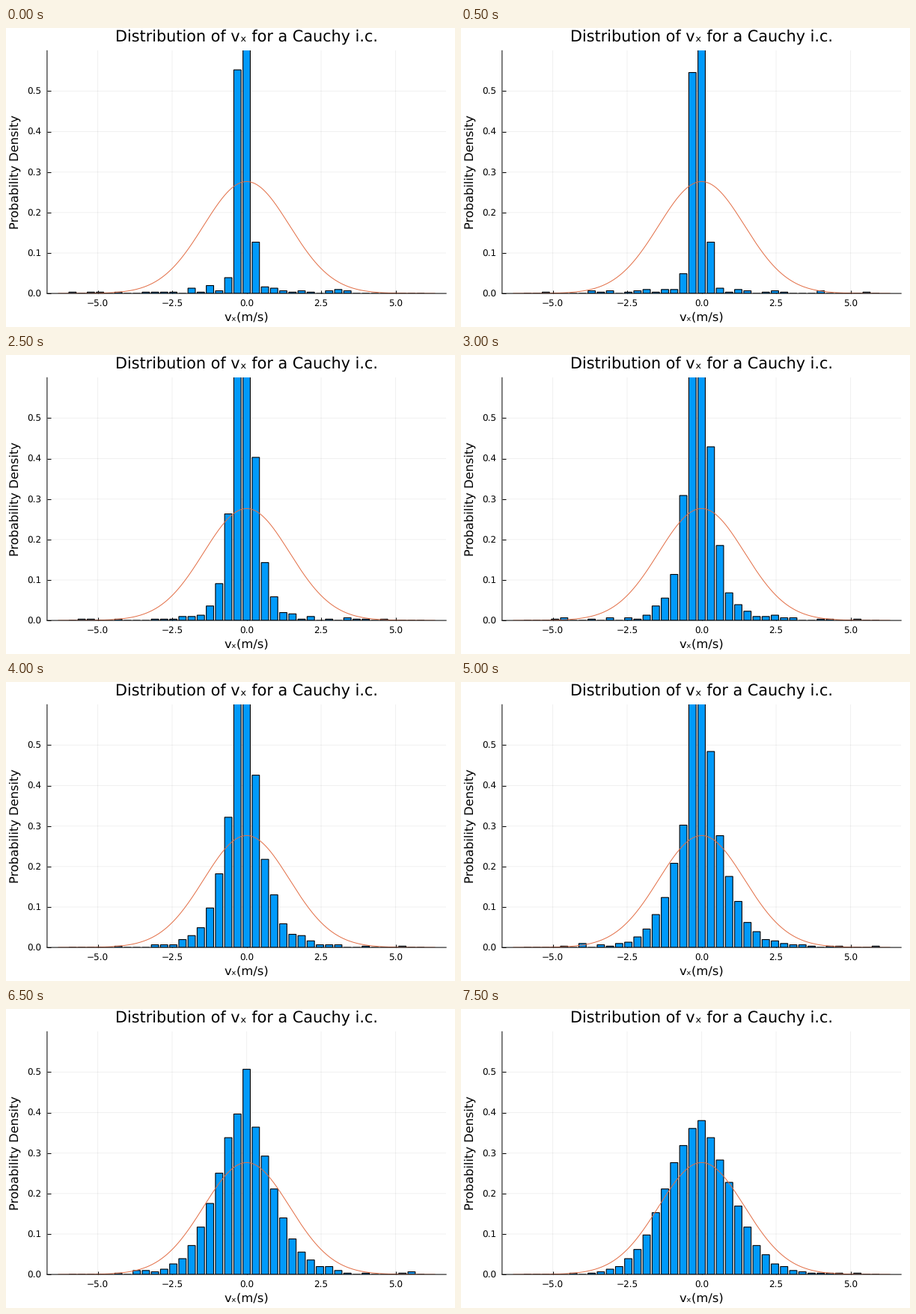
A matplotlib script for the animation above (8 s loop, 600x400 px).

```python
import matplotlib.pyplot as plt
import numpy as np
from matplotlib.animation import FuncAnimation

W, H, DPI = 600, 400, 100
PX = 72 / DPI                       # points per pixel
LEFT, RIGHT, TOP, BOTTOM = 54.9, 588.2, 30.3, 355.1
X_MAX, Y_MAX = 6.7, 0.6
FRAMES, INTERVAL = 16, 500

BINS, PARTICLES, SIGMA = 39, 1000, 1.443
BIN_W = 12 / BINS
UNIT = 1 / (PARTICLES * BIN_W)      # density of one particle
STRAYS = 50                         # particles in the wide Cauchy tail

bins = np.arange(BINS) - BINS // 2


def counts(step):
    """A narrow peak relaxes to a bell over a sparse, random Cauchy tail."""
    rng = np.random.default_rng(step + 3)
    u = step / (FRAMES - 1)
    scale = 0.2 + 4.5 * u**2.1
    power = 0.8 + 0.95 * u**3
    peak = np.exp(-(np.abs(bins + 0.27) / scale)**power)
    peak *= (PARTICLES - STRAYS) / peak.sum()
    tail = 1 / (1 + (bins / 5)**2)
    tail *= STRAYS / tail.sum()
    wobble = 1 + 0.06 * rng.standard_normal(BINS)
    return np.round(peak * wobble) + rng.poisson(tail)


plt.rcParams.update({"font.family": "DejaVu Sans", "path.snap": False,
                     "text.hinting": "none"})
fig = plt.figure(figsize=(W / DPI, H / DPI), dpi=DPI, facecolor="white")
ax = fig.add_axes([LEFT / W, 1 - BOTTOM / H, (RIGHT - LEFT) / W, (BOTTOM - TOP) / H])
ax.set(xlim=(-X_MAX, X_MAX), ylim=(0, Y_MAX))
ax.set_axisbelow(True)
ax.spines[["top", "right"]].set_visible(False)
for side in ("left", "bottom"):
    ax.spines[side].set(linewidth=PX, zorder=5)

x_ticks = np.arange(-5, 5.1, 2.5)
y_ticks = np.arange(6) / 10
ax.set_xticks(x_ticks)
ax.set_yticks(y_ticks)
ax.tick_params(direction="in", length=4.5 * PX, width=PX,
               labelbottom=False, labelleft=False)
ax.grid(color="black", alpha=0.06, linewidth=PX)


def label(x, y, text, size, ha="center", rotation=0):
    fig.text(x / W, 1 - y / H, text, fontsize=size * PX, ha=ha, va="baseline",
             rotation=rotation, rotation_mode="anchor")


center = (LEFT + RIGHT) / 2
label(center + 0.3, 19, "Distribution of vₓ for a Cauchy i.c.", 20.75)
label(center, 392, "vₓ(m/s)", 16.35)
label(16.6, 193, "Probability Density", 16.2, rotation=90)
for v in x_ticks:
    x = center + v * (RIGHT - LEFT) / (2 * X_MAX)
    label(x, 372.4, f"{v:.1f}".replace("-", "−"), 12)
for v in y_ticks:
    y = BOTTOM - v * (BOTTOM - TOP) / Y_MAX
    label(47.6, y + 4.7, f"{v:.1f}", 12, ha="right")

bars = ax.bar(bins * BIN_W, counts(0) * UNIT, 0.8 * BIN_W,
              color="#009afa", edgecolor="black", linewidth=1.1 * PX, zorder=2)
xs = np.linspace(-6.32, 6.32, 400)
ax.plot(xs, np.exp(-xs**2 / (2 * SIGMA**2)) / (SIGMA * np.sqrt(2 * np.pi)),
        color="#e36f47", linewidth=PX, zorder=3)


def update(step):
    for bar, n in zip(bars, counts(step)):
        bar.set_height(n * UNIT)
    return list(bars)


anim = FuncAnimation(fig, update, frames=FRAMES, interval=INTERVAL,
                     repeat=True, repeat_delay=0, blit=False)
plt.show()
```
